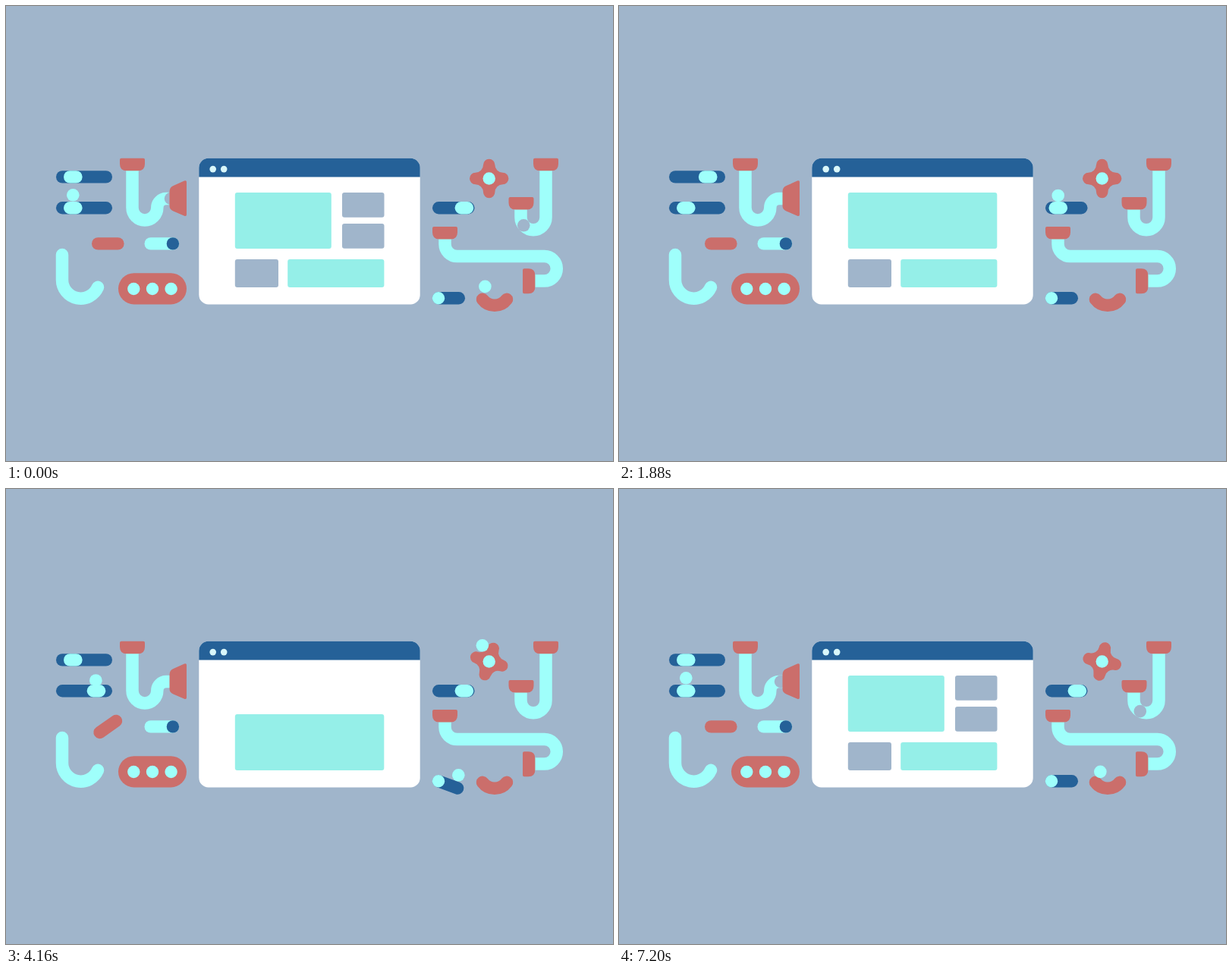
Write an HTML page that moves like this. It is 800 px wide and 600 px high and loops after 7.22 s.

```html
<!DOCTYPE html>
<html lang="en">
<head>
<meta charset="utf-8">
<title>Page machine</title>
<style>
  html, body { margin: 0; height: 100%; overflow: hidden; background: #a0b5cb; }
  svg { display: block; width: 800px; height: 600px; }
  .blue { fill: #256198; }
  .red { fill: #cb6e6b; }
  .cyan { fill: #9ffffb; }
  .teal { fill: #95efe8; }
  .gray { fill: #a0b5cb; }
  .tube { fill: none; stroke: #9ffffb; stroke-width: 16.5; }
  .round { stroke-linecap: round; }
</style>
</head>
<body>
<svg viewBox="0 0 800 600">
  <defs>
    <path id="cap" class="red" d="M-14.5-8.2h29q2 0 2 2v5.4q0 9-9 9h-15q-9 0-9-9v-5.4q0-2 2-2z"/>
    <rect id="handle" class="cyan" x="-12.3" y="-8.2" width="24.6" height="16.4" rx="8.2"/>
    <circle id="dot" r="8.2"/>
  </defs>

  <rect id="bar" class="red" x="113" y="305.2" width="42.6" height="16.4" rx="8.2"/>
  <path class="tube round" d="M74 328V361a24.5 24.5 0 0 0 47 9.8"/>
  <path id="gear" class="red" d="M-7.7-18A7.7 7.7 0 0 1 7.7-18A10.3 10.3 0 0 0 18-7.7A7.7 7.7 0 0 1 18 7.7A10.3 10.3 0 0 0 7.7 18A7.7 7.7 0 0 1-7.7 18A10.3 10.3 0 0 0-18 7.7A7.7 7.7 0 0 1-18-7.7A10.3 10.3 0 0 0-7.7-18z"/>
  <use href="#dot" class="cyan" x="636.7" y="227.5"/>
  <rect id="lever" class="blue" x="562" y="377.1" width="43" height="16.4" rx="8.2"/>
  <use href="#dot" class="cyan" x="570" y="385.3"/>
  <path class="tube round" style="stroke:#cb6e6b" d="M628 386.8a20 20 0 0 0 32 0"/>

  <g id="balls"></g>

  <path id="pipeL" class="tube" d="M166.5 209V266a16.4 16.4 0 0 0 32.8 0a12 12 0 0 1 12-12H228"/>
  <path id="pipeR" class="tube" d="M711.5 209V278.8a16.5 16.5 0 0 1-33 0V260"/>
  <path id="pipeLow" class="tube" d="M578.5 299V314a16 16 0 0 0 16 16H709.5a16.3 16.3 0 0 1 0 32.6H689"/>
  <g id="bubbles"></g>
  <use href="#cap" x="166.5" y="209"/>
  <use href="#cap" x="711.5" y="209"/>
  <use href="#cap" x="679" y="260.2"/>
  <use href="#cap" x="578.5" y="299.2"/>
  <use href="#cap" transform="translate(689.2 362.7) rotate(-90)"/>
  <path class="red" d="M215.5 245q0-6 5-8L235 230.6q3-1 3 1.4V275q0 3-3 1.7L220.5 270.500q-5-2-5-7z"/>

  <g class="blue">
    <rect x="66" y="217.200" width="74" height="16.4" rx="8.2"/>
    <rect x="66" y="258.100" width="74" height="16.4" rx="8.2"/>
    <rect x="562" y="258.100" width="55.500" height="16.4" rx="8.2"/>
  </g>
  <use id="top" href="#handle"/>
  <use id="mid" href="#handle"/>
  <use id="side" href="#handle"/>

  <rect class="cyan" x="182.500" y="305.2" width="45.500" height="16.4" rx="8.2"/>
  <use href="#dot" class="blue" x="219.900" y="313.400"/>
  <rect class="red" x="148" y="352.200" width="90" height="41.200" rx="20.600"/>
  <g class="cyan">
    <use href="#dot" x="168.300" y="373"/>
    <use href="#dot" x="193" y="373"/>
    <use href="#dot" x="217.600" y="373"/>
  </g>

  <rect x="254.300" y="200.800" width="291.400" height="192.700" rx="12.500" fill="#fff"/>
  <path class="blue" d="M254.300 225.500V213.300a12.500 12.500 0 0 1 12.500-12.500H533.200a12.500 12.500 0 0 1 12.500 12.500V225.500z"/>
  <g fill="#d9f7fa"><circle cx="272.700" cy="215.100" r="4.300"/><circle cx="287.200" cy="215.100" r="4.300"/></g>
  <g id="blocks"></g>
</svg>
<script>
const LOOP = 7220, CYCLE = LOOP / 2;
const $ = id => document.getElementById(id);
const clamp = p => Math.min(1, Math.max(0, p));
const inOut = p => p < .5 ? 4 * p ** 3 : 1 - 4 * (1 - p) ** 3;
const ramp = (t, start, span = 300) => inOut(clamp((t - start) / span));
const mix = (a, b, p) => a + (b - a) * p;
const linear = p => p;

function keys(t, list, ease = inOut) {
  let i = 1;
  while (i < list.length - 1 && t > list[i][0]) i++;
  const [t0, a] = list[i - 1], [t1, b] = list[i];
  return mix(a, b, ease(clamp((t - t0) / (t1 - t0))));
}

function add(parent, tag, cls, attrs) {
  const el = document.createElementNS('http://www.w3.org/2000/svg', tag);
  el.setAttribute('class', cls);
  for (const k in attrs) el.setAttribute(k, attrs[k]);
  return $(parent).appendChild(el);
}

// Wraps a cycle time into a window that may run past the cycle's end
const wrap = (t, start) => t < start ? t + CYCLE : t;

// Rows: time, x, y, easing of the move that ends there
// (u: slowing rise, d: speeding fall, e: smooth slide)
const yEase = { u: p => 1 - (1 - p) ** 2, d: p => p * p, e: inOut };
function follow(t, rows) {
  t = wrap(t, rows[0][0]);
  const i = rows.findIndex(r => r[0] > t);
  if (i < 1) return null;
  const [t0, x0, y0] = rows[i - 1], [t1, x1, y1, mode] = rows[i];
  const p = (t - t0) / (t1 - t0);
  return [mix(x0, x1, mode === 'e' ? inOut(p) : p), mix(y0, y1, (yEase[mode] || linear)(p))];
}

const C = CYCLE;
const gearBall = [
  [110, 679, 260], [135, 679, 252], [400, 648, 192.5, 'u'], [550, 628, 206, 'd'],
  [720, 603.7, 249.6], [1220, 603.7, 249.6], [1520, 579, 249.6, 'e'],
  [1900, 578.7, 250], [2110, 578.5, 299, 'd']
];
const leftBall = [
  [3180, 88.3, 225.4], [3320, 88.3, 249.3, 'd'], [C + 200, 88.3, 249.3],
  [C + 500, 118.8, 249.3, 'e'], [C + 710, 117, 303, 'd'], [C + 760, 109, 312],
  [C + 890, 91, 354, 'd'], [C + 930, 91, 363], [C + 990, 98.5, 369, 'u'],
  [C + 1070, 107, 364, 'd'], [C + 1200, 119.5, 354], [C + 1340, 147, 334, 'u'],
  [C + 1480, 176, 343, 'd'], [C + 1550, 182.5, 346], [C + 1720, 192, 373, 'd']
];
const smileBall = [
  [3180, 689, 362.6], [3230, 679, 362.6], [3440, 660, 370, 'd'], [3530, 644, 378],
  [3590, 634.5, 373, 'd'], [C, 631.5, 370], [C + 140, 618, 358, 'u'], [C + 350, 592, 368.8, 'd']
];
const thrown = [[790, 574, 358], [960, 530, 312, 'u']];

const leverAngle = t => keys(t, [[350, 0], [540, 20], [580, 20], [860, -60], [1200, -60], [1460, 0]]);

function leverBall(t) {
  if (t < 350 || t >= 790) return null;
  const a = leverAngle(t) * Math.PI / 180, s = Math.sin(a), c = Math.cos(a);
  return [570 + 22 * c + 16.5 * s, 385.3 + 22 * s - 16.5 * c];
}

const routes = [
  t => follow(t, gearBall),
  t => follow(t, leftBall),
  t => follow(t, smileBall) || leverBall(t) || follow(t, thrown)
];
const balls = routes.map(() => add('balls', 'circle', 'cyan', { r: 8.3 }));

// Distance travelled inside each pipe
const pipes = [
  ['pipeL', [[2990, 0], [3590, 129], [C, 133], [C + 80, 145]]],
  ['pipeR', [[3150, 0], [3590, 104], [C, 110], [C + 110, 141]]],
  ['pipeLow', [[2110, 0], [2420, 44], [2570, 72], [2960, 153], [3050, 181], [3200, 236]]]
].map(([id, list]) => ({ path: $(id), list, el: add('bubbles', 'circle', 'gray', { r: 8.3 }) }));

function place(el, pos) {
  el.setAttribute('visibility', pos ? 'visible' : 'hidden');
  if (pos) el.setAttribute('transform', `translate(${pos[0]} ${pos[1]})`);
}

const block = cls => add('blocks', 'rect', cls, { rx: 3 });
const big = block('teal');
const pair = [block('gray'), block('gray')];
const row = [block('gray'), block('teal')];
const trio = [block('gray'), block('teal'), block('gray')];

function box(el, x, y, width, height, opacity = 1) {
  const attrs = { x, y, width: Math.max(0, width), height, opacity };
  for (const k in attrs) el.setAttribute(k, attrs[k]);
}

const SLIDE = 45;
function layout(t) {
  const width = keys(t, [[700, 127], [1100, 196.5], [5880, 196.5], [6190, 125.3], [6380, 127]]);
  box(big, 301.8, keys(t, [[3300, 246], [3700, 297], [5450, 297], [5850, 246]]), width, 74);

  pair.forEach((el, i) => {
    const k = t < 3000 ? 1 - ramp(t, 680 + 30 * i, 280) : ramp(t, 5960 + 32 * i, 280);
    box(el, 443, 246 + 41 * i, 55.5 * k, 32.7, k);
  });

  row.forEach((el, i) => {
    const first = t < 3000;
    const k = first ? 1 - ramp(t, 1930 - 28 * i) : ramp(t, 4500 - 28 * i);
    const shift = SLIDE * (1 - k) * (first ? 1 : -1);
    const y = first ? 334 : keys(t, [[5450, 246], [5850, 334]]);
    box(el, (i ? 371.2 : 301.8) + shift, y, i ? 127.2 : 57.2, 37, k);
  });

  trio.forEach((el, i) => {
    const enter = ramp(t, 2253 - 28 * i), leave = ramp(t, 3030 - 28 * i);
    box(el, 301.8 + 69.7 * i + SLIDE * (enter - 1 + leave), 336, 57.3, 37, enter * (1 - leave));
  });
}

function draw() {
  const now = performance.now() % LOOP, t = now % CYCLE;

  place($('top'), [keys(t, [[700, 88.3], [1000, 117.2], [2862, 117.2], [3162, 88.3]]), 225.4]);
  place($('mid'), [keys(t, [[200, 88.3], [500, 119], [700, 119], [1000, 88.3]]), 266.3]);
  place($('side'), [keys(t, [[1220, 603.9], [1520, 578.8], [2402, 578.8], [2702, 603.9]]), 266.3]);

  const tilt = keys(t, [[200, 0], [500, -35], [984, -35], [1284, 0]]);
  $('bar').setAttribute('transform', `rotate(${tilt} 134.3 313.4)`);
  $('lever').setAttribute('transform', `rotate(${leverAngle(t)} 570 385.3)`);

  // The gear spins up briefly, then turns steadily
  const spin = -.15 * (now < 160 ? now * now / 320 : now - 80);
  $('gear').setAttribute('transform', `translate(636.7 227.5) rotate(${spin})`);

  balls.forEach((el, i) => place(el, routes[i](t)));
  for (const { path, list, el } of pipes) {
    const time = wrap(t, list[0][0]);
    const inside = time < list[list.length - 1][0];
    const p = inside && path.getPointAtLength(keys(time, list, linear));
    place(el, p && [p.x, p.y]);
  }
  layout(now);
  requestAnimationFrame(draw);
}
draw();
</script>
</body>
</html>
```
